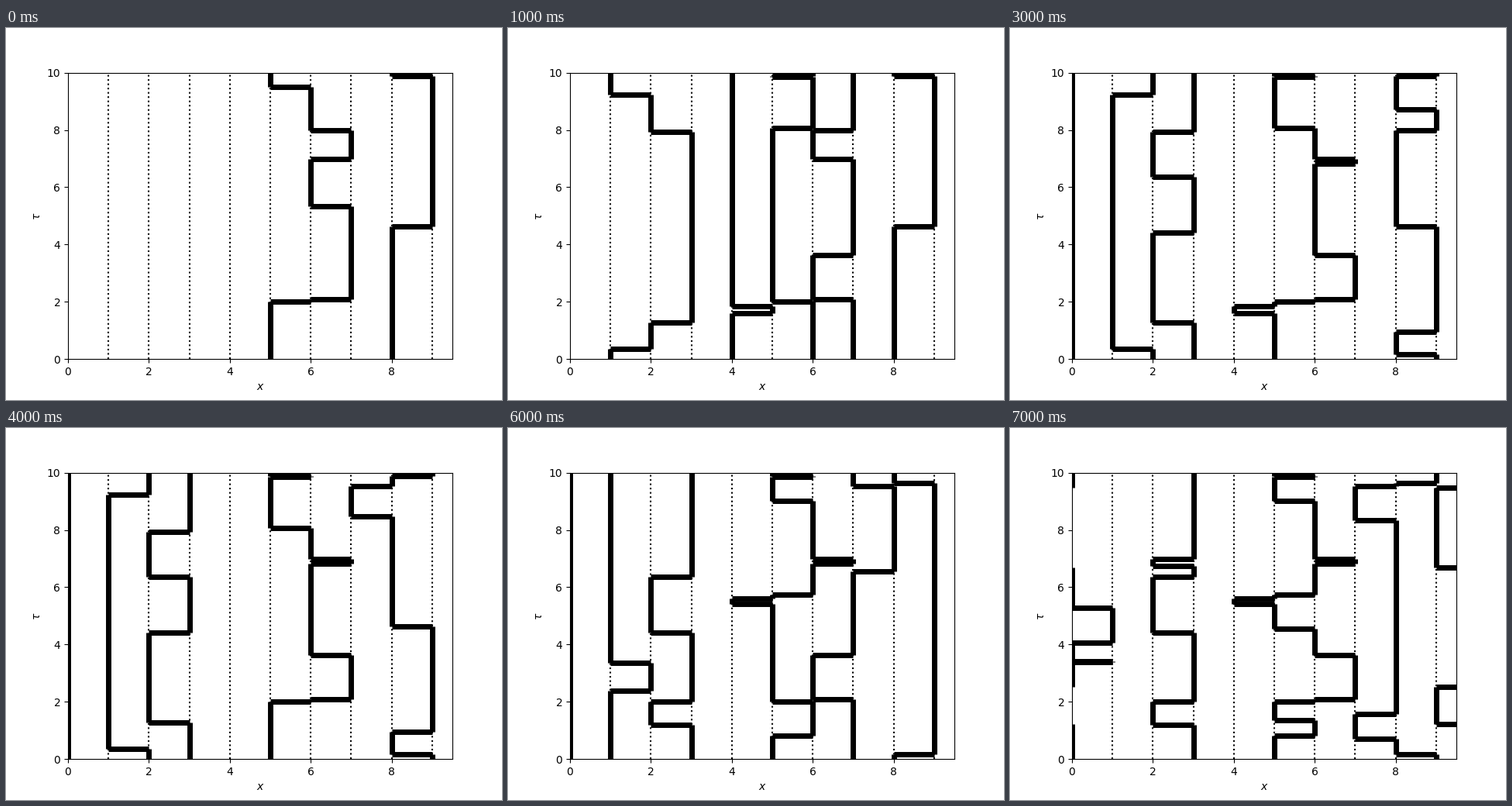
A matplotlib script that plays this animation: 640x480 px, repeating every 8 s.

```python
import matplotlib.pyplot as plt
from matplotlib.animation import FuncAnimation
from matplotlib.collections import LineCollection

SITES = 10
BETA = 10

# Each step: one occupied site per linked group, and the hops
# {bond: times} that are switched on or off. The rest is derived.
STEPS = [
    ((5, 8), {5: (2.0, 9.5), 6: (2.08, 5.33, 6.98, 8.0), 8: (4.62, 9.88)}),
    ((1, 4, 8), {1: (0.36, 9.23), 2: (1.28, 7.93), 4: (1.6, 1.85),
                 5: (8.07, 9.5, 9.86, 9.89), 6: (3.62, 5.33)}),
    ((1, 4, 8), {2: (3.66, 6.36), 4: (8.37, 9.31),
                 6: (6.82, 7.63), 8: (7.99, 8.72)}),
    ((0, 2, 5, 9), {2: (3.66, 4.41), 4: (8.37, 9.31),
                    6: (7.63, 8.0), 8: (0.17, 0.95)}),
    ((0, 2, 5, 9), {4: (1.6, 1.85), 7: (8.47, 9.53), 8: (7.99, 8.72)}),
    ((2, 4, 5), {1: (2.38, 9.23), 2: (1.28, 7.93),
                 5: (0.81, 9.01), 8: (0.95, 9.88)}),
    ((0, 1, 5), {1: (0.36, 3.36), 2: (1.2, 2.01), 4: (5.43, 5.61),
                 5: (5.74, 8.07), 7: (6.55, 8.47), 8: (4.62, 9.64)}),
    ((0, 3), {0: (3.39, 3.42, 4.06, 5.27), 1: (2.38, 3.36),
              2: (6.74, 6.98), 5: (1.36, 4.55),
              7: (0.7, 1.57, 6.55, 8.33), 9: (1.22, 2.52, 6.69, 9.47)}),
]


def ends(bond):
    return bond, (bond + 1) % SITES


def hops_at(step):
    hops = set()
    for _, changes in STEPS[:step + 1]:
        hops ^= {(t, b) for b, times in changes.items() for t in times}
    return sorted(hops)


def start_sites(hops, seeds):
    """Occupied sites at tau = 0: every hop needs a particle and a hole."""
    def flips(site, t):
        return sum(s < t and site in ends(b) for s, b in hops)

    occupied = dict.fromkeys(seeds, 1)
    queue = list(seeds)
    for site in queue:
        for bond in ((site - 1) % SITES, site):
            other = sum(ends(bond)) - site
            first = min((t for t, b in hops if b == bond), default=None)
            if first is None or other in occupied:
                continue
            parity = flips(site, first) + flips(other, first)
            occupied[other] = (1 + occupied[site] + parity) % 2
            queue.append(other)
    return [site for site in occupied if occupied[site]]


def worldlines(step):
    """Segments traced by the particles as they hop across bonds."""
    hops = hops_at(step)
    since = dict.fromkeys(start_sites(hops, STEPS[step][0]), 0)
    segments = []
    for t, bond in hops:
        left, right = ends(bond)
        old, new = (left, right) if left in since else (right, left)
        segments.append([(old, since.pop(old)), (old, t)])
        segments.append([(bond, t), (bond + 1, t)])
        since[new] = t
    segments += [[(site, t), (site, BETA)] for site, t in since.items()]
    return segments


fig, ax = plt.subplots(figsize=(6.4, 4.8), dpi=100)
for site in range(1, SITES):
    ax.plot([site, site], [0, BETA], "k:", lw=1.5)
ax.set(xlim=(0, SITES - 0.5), ylim=(0, BETA), xlabel="$x$", ylabel=r"$\tau$")
paths = ax.add_collection(LineCollection([], colors="k", linewidths=5))


def update(step):
    paths.set_segments(worldlines(step))
    return [paths]


anim = FuncAnimation(fig, update, frames=len(STEPS), interval=1000,
                     repeat=True, repeat_delay=0)
plt.show()
```
